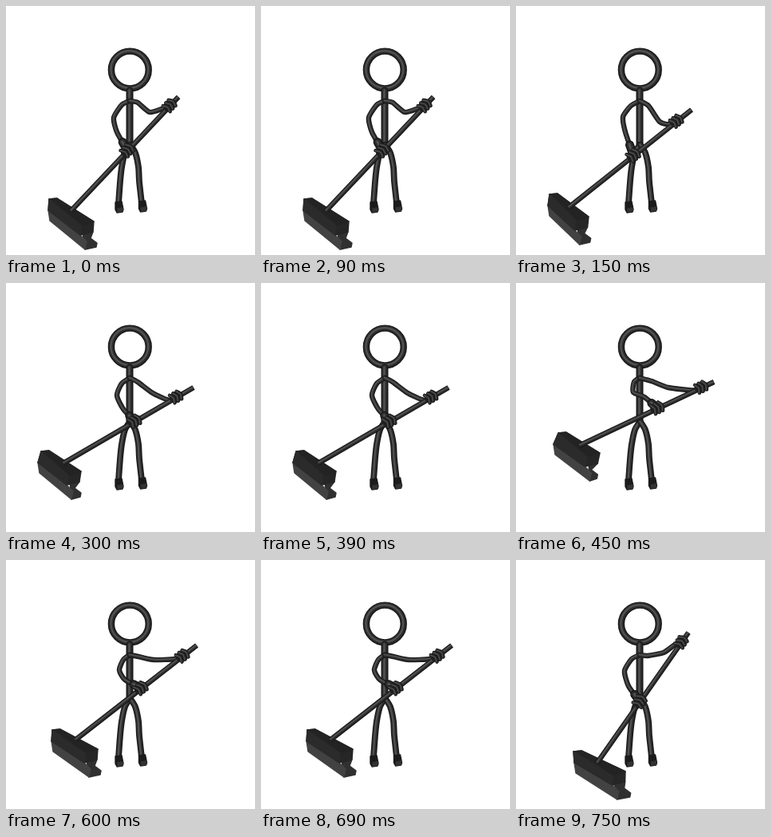
These frames come from a looping animation (312x312 px, 900 ms). An HTML page with a canvas:

```html
<!DOCTYPE html>
<html lang="en">
<head>
<meta charset="utf-8">
<title>Sweeping figure</title>
<style>
html, body { margin: 0; width: 100%; height: 100%; overflow: hidden; background: #fff; }
canvas { display: block; width: 312px; height: 312px; }
</style>
</head>
<body>
<canvas id="stage" width="312" height="312"></canvas>
<script>
const ctx = document.getElementById('stage').getContext('2d');
const STEP = 150;

// shaft: broom end and top end; block: left and right top corners;
// grips: x of each hand on the shaft; arms: points between shoulder and hand
const poses = [
  { shaft: [[84,254], [216,114]], block: [[54,242], [110,270]], lean: 0, grips: [152,205],
    left: [[145,124], [135,140], [139,158]], right: [[165,121], [180,133]] },
  { shaft: [[69,250], [220,130]], block: [[42,236], [91,264]], lean: -1, grips: [147,201],
    left: [[144,125], [134,139], [137,158]], right: [[166,125], [180,145]] },
  { shaft: [[75,224], [235,131]], block: [[44,211], [94,236]], lean: -3, grips: [161,213],
    left: [[145,126], [139,141], [147,158]], right: [[165,124], [184,138]] },
  { shaft: [[83,202], [248,124]], block: [[53,188], [105,213]], lean: -5, grips: [177,232],
    left: [[148,124], [147,137], [161,143]], right: [[170,123], [191,131]] },
  { shaft: [[90,223], [239,107]], block: [[58,213], [115,237]], lean: 0, grips: [169,221],
    left: [[147,125], [142,138], [149,150]], right: [[166,121], [185,125]] },
  { shaft: [[104,251], [216,91]], block: [[72,240], [137,265]], lean: 2, grips: [155,207],
    left: [[145,124], [136,139], [141,158]], right: [[165,120], [185,116]] }
];

const add = ([x, y], dx, dy) => [x + dx, y + dy];
const mix = (a, b, t) => a.map((v, i) => v + (b[i] - v) * t);

function fill(points, color) {
  ctx.beginPath();
  points.forEach(p => ctx.lineTo(...p));
  ctx.closePath();
  ctx.lineWidth = 1.4;
  ctx.lineJoin = 'round';
  ctx.fillStyle = ctx.strokeStyle = color;
  ctx.fill();
  ctx.stroke();
}

// Smooth curve through the given points, tight enough to keep the joints
function curve(points) {
  const path = new Path2D();
  path.moveTo(...points[0]);
  for (let i = 0; i < points.length - 1; i++) {
    const b = points[i], c = points[i + 1];
    const a = points[i - 1] || b, d = points[i + 2] || c;
    path.bezierCurveTo(
      b[0] + (c[0] - a[0]) / 9, b[1] + (c[1] - a[1]) / 9,
      c[0] - (d[0] - b[0]) / 9, c[1] - (d[1] - b[1]) / 9, ...c);
  }
  return path;
}

// A rounded dark rod with a soft highlight
function tube(path, width, cap = 'round') {
  ctx.lineCap = cap;
  ctx.lineJoin = 'round';
  [['#191919', 1, 0], ['#2d2d2d', .68, -.2], ['#525252', .26, -.5]].forEach(([color, part, shift]) => {
    ctx.save();
    ctx.translate(shift, shift);
    ctx.strokeStyle = color;
    ctx.lineWidth = width * part;
    ctx.stroke(path);
    ctx.restore();
  });
}

function foot(x, y) {
  fill([[x, y], [x + 8, y - 1], [x + 10, y + 9], [x + 9, y + 12], [x + 2, y + 13], [x, y + 9]], '#1b1b1b');
  fill([[x + 3, y + 8], [x + 9, y + 7], [x + 9, y + 11], [x + 3, y + 12]], '#333');
}

function body() {
  const ring = new Path2D();
  ring.arc(155.3, 80, 23.4, 0, 7);
  tube(ring, 8.4);
  tube(curve([[155,106], [155,173]]), 9);
  tube(curve([[155,174], [149,184], [145,202], [143,220], [141,247]]), 7.8);
  tube(curve([[156,174], [162,184], [166,202], [167,220], [170,247]]), 7.8);
  foot(137, 246);
  foot(166.5, 245);
}

function broom(block, lean) {
  const [a, c] = block;
  const b = add(a, 10, -1);
  const g = add(c, -16, 5);
  const d = add(c, -1 + lean / 3, 13);
  const e = add(d, -16, 4);
  const f = add(a, -1 + lean, 14);
  fill([add(g, 2, 8), d, add(d, -3 + lean, 8), add(d, 5 + lean, 14),
    add(d, 4 + lean, 19), add(e, 6, 18)], '#303030');
  fill([f, e, add(e, 8, 8), add(e, 6, 18), add(f, 2, 13)], '#424242');
  fill([a, b, c, d, e, f], '#262626');
  fill([a, b, c, g], '#232323');
  fill([a, g, e, f], '#2b2b2b');
}

function hand([x, y], angle, size) {
  ctx.save();
  ctx.translate(x, y);
  ctx.rotate(angle);
  ctx.beginPath();
  ctx.ellipse(0, 0, 9 * size, 7.5 * size, 0, 0, 7);
  ctx.fillStyle = '#202020';
  ctx.fill();
  for (const i of [-1, 0, 1]) {
    tube(curve([[i * 5 - 1, -6 * size], [i * 5 + 2, 0], [i * 5, 6 * size]]), 4.5);
  }
  ctx.restore();
}

function draw({ shaft, block, lean, grips, left, right }) {
  const [[x0, y0], [x1, y1]] = shaft;
  const slope = (y1 - y0) / (x1 - x0);
  const hands = grips.map(x => [x, y0 + (x - x0) * slope - 1]);
  const wrist = mix(hands[0], left[2], .45);
  ctx.clearRect(0, 0, 312, 312);
  body();
  tube(curve([[155,119], ...left, hands[0]]), 6.4);
  tube(curve([[155,119], ...right, add(hands[1], -9, 4), hands[1]]), 6.4);
  broom(block, lean);
  tube(curve([mix(shaft[0], shaft[1], -.02), shaft[1]]), 6.5, 'butt');
  tube(curve([wrist, hands[0]]), 11);
  hands.forEach((point, i) => hand(point, Math.atan(slope), i ? .95 : 1));
}

function play() {
  draw(poses[Math.floor(performance.now() / STEP) % poses.length]);
  requestAnimationFrame(play);
}
play();
</script>
</body>
</html>
```
